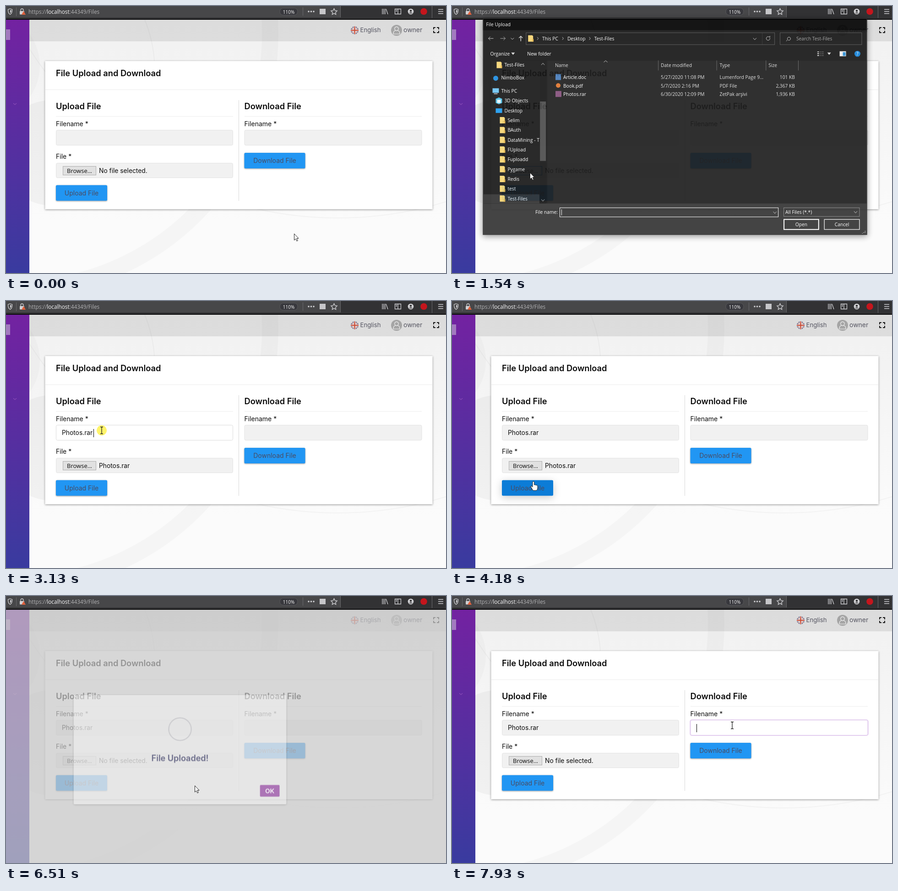
An HTML page for the animation above (8000 ms loop, 961x582 px).

```html
<!DOCTYPE html>
<html lang="en">
<head>
<meta charset="utf-8">
<title>File upload and download</title>
<style>
html, body { margin: 0; width: 100%; height: 100%; overflow: hidden; background: #fafafa; }
svg { display: block; width: 961px; height: 582px; }
text { font: 14px Inter, sans-serif; fill: #0b0b0b; white-space: pre; }
.head { font-size: 18.3px; font-weight: 600; }
.btn { fill: #4b4b60; text-anchor: middle; }
.top { font-size: 13.2px; fill: #545460; }
.url { font: 11.8px "Open Sans", sans-serif; fill: #b1b1b3; }
.field { fill: #f1f1f1; stroke: #e3e3e3; }
.line { fill: none; stroke-width: 1.3; stroke: #d0d0d3; }
.blue { fill: #2196f3; filter: drop-shadow(0 1px 1.5px rgba(0,0,0,.4)); }
#dialog { filter: drop-shadow(0 3px 7px rgba(0,0,0,.45)); transform-origin: 487px 263px; }
#dialog text { font: 10.3px "Open Sans", sans-serif; fill: #fff; }
#dialog text.soft { fill: #dedede; }
#dialog text.dim { fill: #a5a5a5; }
#dialog text.end { text-anchor: end; }
#dialog text.mid { text-anchor: middle; }
#dialog .thin { fill: none; stroke: #c8c8c8; }
#modal { transform-origin: 380px 335px; }
</style>
</head>
<body>
<svg viewBox="0 0 961 582">
  <defs>
    <linearGradient id="side" x2="0" y2="1"><stop stop-color="#7322a1"/><stop offset="1" stop-color="#393b9f"/></linearGradient>
    <linearGradient id="page" x2="0" y2="1"><stop stop-color="#f1f1f1"/><stop offset=".2" stop-color="#f3f3f3"/><stop offset=".8" stop-color="#fbfbfb"/></linearGradient>
    <clipPath id="round"><circle cx="761.5" cy="53" r="8.5"/></clipPath>
    <clipPath id="tree"><rect x="66" y="118" width="124" height="313"/></clipPath>
  </defs>

  <!-- page background -->
  <rect y="30" width="961" height="552" fill="url(#page)"/>
  <g fill="none" stroke="#000">
    <circle cx="20" cy="60" r="557" stroke-width="36" stroke-opacity=".025"/>
    <circle cx="-45" cy="130" r="119" fill="#000" fill-opacity=".018" stroke="none"/>
    <circle cx="100" cy="320" r="115" fill="#000" fill-opacity=".035" stroke="none"/>
    <circle cx="725" cy="-338" r="800" stroke-opacity=".03" stroke-width="2"/>
    <path d="M303 30Q321 74 324 120" stroke-opacity=".03" stroke-width="2"/>
  </g>
  <rect x="51" y="30" width="910" height="47" fill="#000" fill-opacity=".085"/>
  <rect y="30" width="51" height="552" fill="url(#side)"/>
  <rect y="51" width="9" height="23" fill="#a27abf"/>
  <path d="M16 212l3.500 3 3.500-3" fill="none" stroke="#a35fc4"/>

  <!-- header -->
  <g clip-path="url(#round)">
    <path d="M753 44h17v18h-17z" fill="#3c4a78"/>
    <path d="M753 44.500l17 17m0-17l-17 17" stroke="#eee" stroke-width="3"/>
    <path d="M753 44.500l17 17m0-17l-17 17" stroke="#c8503c"/>
    <path d="M761.500 44v18M753 53h17" stroke="#eee" stroke-width="5"/>
    <path d="M761.500 44v18M753 53h17" stroke="#c8503c" stroke-width="2.500"/>
  </g>
  <text class="top" x="773.500" y="57">English</text>
  <circle cx="853" cy="53" r="12" fill="#a5a5a5"/>
  <g fill="none" stroke="#f2f2f2" stroke-width="1.200"><circle cx="853" cy="49.500" r="4.200"/><path d="M846 61q0-7 4.500-7.500h5q4.500 .5 4.500 7.500z"/></g>
  <text class="top" x="868" y="57" style="font-size:14px">owner</text>
  <path d="M934 51v-4h4m3 0h4v4m0 3v4h-4m-3 0h-4v-4" fill="none" stroke="#1c1c1c" stroke-width="2"/>

  <!-- card -->
  <rect x="85.500" y="120" width="846" height="323" fill="#fff" style="filter:drop-shadow(0 1px 2px rgba(0,0,0,.42))"/>
  <path d="M86 182.500h845M109 240.500h387M521 240.500h387" stroke="#ececec"/>
  <path d="M508.500 206v218" stroke="#c6c6c6" stroke-dasharray="2 1"/>
  <text class="head" x="109" y="153">File Upload and Download</text>
  <text class="head" x="109" y="225">Upload File</text>
  <text class="head" x="520.500" y="225">Download File</text>
  <text x="109" y="262">Filename *</text>
  <text x="520.500" y="262">Filename *</text>
  <text x="109" y="333">File *</text>
  <rect id="glowA" x="107.500" y="269" width="390" height="36" rx="5" fill="#ead9f4"/>
  <rect id="glowB" x="519" y="269" width="391" height="36" rx="5" fill="#ead9f4"/>
  <rect id="fieldA" class="field" x="109.500" y="270.500" width="386" height="33" rx="3"/>
  <rect id="fieldB" class="field" x="521" y="270.500" width="387" height="33" rx="3"/>
  <rect class="field" x="109.500" y="342.500" width="386" height="32" rx="3"/>
  <rect id="sel" y="278" height="19" fill="#a5cdf3"/>
  <text id="name" x="122" y="292" style="font-size:13.800px"></text>
  <path id="caretA" d="M191.500 279v18" stroke="#000"/>
  <path id="caretB" d="M534.500 279v18" stroke="#000"/>
  <rect id="browse" x="124.500" y="349.500" width="72" height="19"/>
  <text x="133" y="364" style="font:13px 'Open Sans',sans-serif">Browse...</text>
  <text id="file" x="203" y="364" style="font-size:13.800px"></text>
  <rect id="upload" class="blue" x="109" y="390.500" width="112" height="34" rx="2.500"/>
  <text class="btn" x="165" y="412.500">Upload File</text>
  <rect class="blue" x="520.500" y="320" width="133" height="34" rx="2.500"/>
  <text class="btn" x="587" y="341.500">Download File</text>

  <!-- busy layer and message -->
  <g id="busy">
    <rect y="30" width="961" height="552" fill="#fff" fill-opacity=".674"/>
    <path id="spin" d="M362 335a18 18 0 0 1 30-13" fill="none" stroke="#fff" stroke-width="4"/>
  </g>
  <rect id="shade" y="30" width="961" height="552"/>
  <g id="modal">
    <rect id="panel" x="144" y="214" width="472" height="242" rx="2" fill="#fff" style="filter:drop-shadow(0 1px 2px rgba(0,0,0,.4))"/>
    <g id="content">
      <circle cx="380" cy="289.500" r="25" fill="none" stroke="#bdbdc2" stroke-width="1.800"/>
      <path id="tick" d="M368 290l8 8 16-17" fill="none" stroke="#8fcf6c" stroke-width="3.500" stroke-dasharray="35"/>
      <text x="380" y="360.500" text-anchor="middle" style="font-size:18.300px;font-weight:600;fill:#494a70">File Uploaded!</text>
      <rect x="557.500" y="413" width="43.500" height="26" rx="2" fill="#9c55a9"/>
      <text x="579.300" y="431" text-anchor="middle" style="font-weight:600;fill:#fff">OK</text>
    </g>
  </g>

  <!-- browser bar -->
  <rect width="961" height="30" fill="#0c0c0d"/>
  <rect width="961" height="28" fill="#323234"/>
  <rect width="730" height="25" fill="#474749"/>
  <path d="M22.500 3v19M648.500 3v18M730.500 0v25M930.500 0v26" stroke="#6a6a6d"/>
  <path class="line" d="M9 6l4.500 1.500q.5 8-4.500 11-5-3-4.500-11z"/>
  <path d="M9 8.500v7q3-2 2.800-6z" fill="#d0d0d3"/>
  <path class="line" d="M32 11V9a3 3 0 0 1 6 0v2"/>
  <rect x="30" y="11" width="10" height="7.500" rx="1" fill="#d0d0d3"/>
  <path d="M38.500 11l4.500 8h-9z" fill="#e0603c"/>
  <text class="url" x="49" y="17">https://<tspan fill="#f9f9fa">localhost</tspan>:44349/Files</text>
  <rect x="598" y="4.500" width="39" height="15.500" rx="7.500" fill="#38383d" stroke="#59595c"/>
  <text class="url" x="617.500" y="16.500" text-anchor="middle" style="font-size:10px;fill:#f9f9fa">110%</text>
  <g fill="#d0d0d3"><circle cx="661" cy="12" r="1.800"/><circle cx="666.500" cy="12" r="1.800"/><circle cx="672" cy="12" r="1.800"/></g>
  <rect x="685" y="6" width="13" height="12" fill="#c6c6c9"/>
  <path class="line" d="M716.500 5.500l2 4.300 4.700.6-3.400 3.300.8 4.700-4.100-2.300-4.100 2.300.8-4.700-3.400-3.300 4.700-.6z"/>
  <path class="line" d="M822 6v12M825 6v12M828 6v12M830 6.500l4 11.500" stroke-width="1.800"/>
  <path class="line" d="M849.500 6.500h13v11h-13zM856 6.500v11M851.500 9h2.500m-2.500 2.500h2.500"/>
  <circle cx="884" cy="12" r="6.300" fill="#d0d0d3"/>
  <circle cx="884" cy="10.500" r="2.300" fill="#323234"/><path d="M880 16q4-4 8 0" fill="#323234"/>
  <circle cx="912.500" cy="12" r="7.300" fill="#c5161d"/>
  <path class="line" d="M944 7.500h11M944 12h11M944 16.500h11" stroke-width="1.800"/>

  <g id="dialog"></g>

  <!-- pointer -->
  <g id="pointer">
    <circle id="click" r="11" fill="#ffee1e"/>
    <path id="arrow" d="M.5.5V14.500L3.700 11.500 6 16.500 8.200 15.400 6 10.500H10Z" fill="#fff" stroke="#222"/>
    <path id="hand" d="M-2 1.500Q0-1.500 1.700 1.500V8l2-.5 1.500 1 2-.3 1.800 1.800V15q-.5 3-2 5H-1L-5.500 12.500q-.5-2.500 1.500-2l2 2z" fill="#fff" stroke="#222"/>
    <path id="beam" d="M-3-7.500H-1L0-6.500 1-7.500H3M-3 7.500H-1L0 6.500 1 7.500H3M0-6.500v13" fill="none" stroke="#222" stroke-width="1.300"/>
  </g>
</svg>
<script>
const $ = id => document.getElementById(id);
const set = (id, attrs) => { for (const k in attrs) $(id).setAttribute(k, attrs[k]); };
const show = (id, on) => set(id, { opacity: +on });

// dialog parts
const text = (x, y, s, cls = '') => `<text x="${x}" y="${y}" class="${cls}">${s}</text>`;
const box = (x, y, w, h, fill, more = '') => `<rect x="${x}" y="${y}" width="${w}" height="${h}" fill="${fill}" ${more}/>`;
const dot = (x, y, r, fill) => `<circle cx="${x}" cy="${y}" r="${r}" fill="${fill}"/>`;
const thin = (d, more = '') => `<path class="thin" d="${d}" ${more}/>`;
const folder = (x, y) => `<path d="M${x} ${y - 7}h9l2 2v12H${x}z" fill="#f7d675"/><path d="M${x + 9} ${y + 1}h3v6h-3z" fill="#e3b349"/>`;
const down = (x, y) => thin(`M${x - 3.5} ${y - 2}l3.500 4 3.500-4`);
const right = (x, y) => thin(`M${x - 1} ${y - 3}l2.500 3-2.500 3`);
const screen = (x, y, c) => box(x, y - 5, 14, 10, c);

const folders = ['Selim', 'BAuth', 'DataMining - T', 'FUpload', 'Fuploadd', 'Pygame', 'Redis', 'test', 'Test-Files'];
const rowY = i => 249 + 21.4 * i;
const files = [
  ['Article.doc', '5/27/2020 11:08 PM', 'Lumenford Page 9...', '101 KB', box(225, 148, 12, 13, '#4a7ebb')],
  ['Book.pdf', '5/7/2020 2:16 PM', 'PDF File', '2,367 KB', dot(231, 173, 5, '#e0762f')],
  ['Photos.rar', '6/30/2020 12:09 PM', 'ZetPak arşivi', '1,936 KB', box(225, 185, 13, 13, '#85507c')]
];
const columns = [[224, 'Name'], [456, 'Date modified'], [585, 'Type'], [692, 'Size']];

$('dialog').innerHTML =
  box(66, 26, 842, 473.5, '#191919') + box(66, 26, 842, 26, '#050505') +
  box(207, 118, 701, 313, '#202020') + box(66, 431, 842, 68.5, '#353535') +
  box(66.5, 26.5, 841, 473, 'none', 'stroke="#3c3c3c"') +
  '<text id="title" y="43">File Upload</text>' +
  thin('M89 70H78m4-4l-4 4 4 4') + thin('M104 70h11m-4-4l4 4-4 4', 'opacity=".8"') +
  thin('M127 69l3.500 3 3.500-3') + thin('M149 76V65m-4 4l4-4 4 4', 'stroke-width="1.600"') +
  box(160.5, 57.5, 545, 26, 'none', 'stroke="#555"') + box(717.5, 57.5, 179, 26, 'none', 'stroke="#555"') +
  folder(165, 70) + [186, 241, 300].map(x => right(x, 70)).join('') +
  text(196, 74, 'This PC') + text(251, 74, 'Desktop') + text(310, 74, 'Test-Files') +
  down(662, 71) + thin('M678.5 58v25', 'opacity=".15"') + thin('M695 69a4 4 0 1 1-2-2.500l2 1v-3') +
  thin('M731 76l3-3.500a3.500 3.500 0 1 1 1 1') + text(753, 74, 'Search Test-Files', 'dim') +
  text(82, 107, 'Organize') + text(163, 107, 'New folder') +
  '<path d="M128 101h8l-4 5zM821 101h8l-4 5z" fill="#ddd"/>' +
  thin('M799 99.500h4m-4 4h4m-4 4h4', 'stroke-width="2"') + thin('M805 99.500h3m1 0h4m-8 4h3m1 0h4m-8 4h3m1 0h4', 'opacity=".6"') +
  box(848, 98, 14, 11, '#eee') + box(855, 100, 6, 8, '#2d8fd5') +
  dot(887, 103.5, 6.5, '#1683d8') + text(887, 107, '?', 'mid') +
  '<g clip-path="url(#tree)">' + box(66, 411, 124, 20, '#333') +
  folder(96, 128) + text(113, 132, 'Test-Files') + dot(94, 157, 5.5, '#1f8de0') + text(106, 160, 'NimboBox') +
  screen(87, 184, '#6fc4f4') + box(90, 190, 8, 2, '#aaa') + text(106, 189, 'This PC') +
  '<path d="M94 202l7-3 7 3v9l-7 3-7-3z" fill="#4fc0e8"/><path d="M97 204h8v7h-8z" fill="#eaf8fd"/>' + text(113, 210, '3D Objects') +
  screen(94, 228, '#1f9cf0') + text(113, 232, 'Desktop') +
  folders.map((s, i) => folder(103, rowY(i)) + text(120, rowY(i) + 4, s)).join('') + '</g>' +
  box(191, 118, 13, 313, '#171717') + box(191, 208, 13, 130, '#4d4d4d') +
  down(197.5, 424) + thin('M194 128l3.500-4 3.500 4') + thin('M331 122l4-3.500 4 3.500') +
  '<path d="M450.500 118v22M578.500 118v22M686.500 118v22M757.500 118v22" stroke="#636363"/>' +
  columns.map(([x, s]) => text(x, 133, s, 'soft')).join('') +
  '<rect id="row" x="221" y="183" width="533" height="19"/>' +
  files.map(([name, date, type, size, icon], i) => {
    const y = 158.5 + 18.8 * i;
    return icon + text(242, y, name) + text(456, y, date, 'soft') + text(585, y, type, 'soft') + text(750, y, size, 'soft end');
  }).join('') +
  text(230, 454, 'File name:', 'end') + box(234.5, 440.5, 479, 20, '#353535', 'stroke="#fff"') +
  '<text id="chosen" x="238" y="454.500"></text><path id="caretC" d="M238.500 444v13" stroke="#fff"/>' + down(706, 451) +
  box(725.5, 440.5, 166, 19, '#353535', 'stroke="#8a8a8a"') + text(729, 454, 'All Files (*.*)') + down(883, 450) +
  box(726, 466, 76, 22, '#353535', 'stroke="#fff" stroke-width="2"') + text(764, 480.5, 'Open', 'mid') +
  box(814.5, 466, 77, 22, '#353535', 'stroke="#ddd" stroke-width="1.500"') + text(853, 480.5, 'Cancel', 'mid') +
  thin('M904 491v6M901 494v3M898 496v1', 'stroke-dasharray="1.500 1.500" stroke-width="1.500"') +
  `<g id="early">${dot(79, 39, 6.5, '#e8792c')}${thin('M889 34l9 9m0-9l-9 9')}${box(66, 346, 124, 21, '#fff', 'fill-opacity=".18"')}
   ${down(75, 185)}${down(83, 228)}${folders.map((s, i) => right(90, rowY(i))).join('')}</g>`;

// keyframes: [time, value, value...]
function at(keys, t, ease = p => p) {
  const i = keys.findIndex(k => k[0] > t);
  if (i < 0) return keys.at(-1).slice(1);
  if (!i) return keys[0].slice(1);
  const a = keys[i - 1], b = keys[i], p = ease((t - a[0]) / (b[0] - a[0]));
  return a.slice(1).map((v, n) => v + (b[n + 1] - v) * p);
}
const smooth = p => p * p * (3 - 2 * p);
const between = (t, a, b) => t >= a && t < b;

const path = [
  [250, 629, 496], [1020, 170, 363], [1550, 170, 363], [1870, 258, 203], [1920, 258, 203], [2120, 269, 192],
  [2380, 269, 192], [2630, 250, 372], [2750, 250, 372], [3070, 209, 282], [3150, 209, 282], [3330, 66, 263],
  [3530, 190, 288], [3600, 190, 288], [3730, 230, 316], [4180, 178, 393], [4360, 178, 393], [4410, 179, 393],
  [4560, 178, 393], [5670, 178, 393], [5680, 197, 393], [5800, 197, 393], [6480, 412, 413], [6540, 412, 413],
  [7020, 576, 425], [7300, 576, 425], [7720, 612, 282]
];
const clicks = [1080, 2090, 2230, 3080, 3690, 5710, 7080, 7740];
const dialogFade = [[1340, 0, .94], [1410, .4, .97], [1560, 1, 1], [2320, 1, 1], [2480, 0, .93]];
const modalFade = [[6440, 0], [6510, .39], [6620, 1], [7300, 1], [7480, 0]];
const modalScale = [[6440, .9], [6510, .983], [6560, 1.04], [6640, .97], [6720, 1]];
const busyFade = [[5780, 0], [5960, 1], [6510, 1], [6660, 0]];
const glowA = [[3130, 0], [3280, 1], [3700, 1], [3850, 0]];
const glowB = [[7750, 0], [7900, 1]];
const hoverUp = [[4080, 0], [4180, 1], [5760, 1], [5900, 0]];

function focusField(id, on, glow) {
  show('glow' + id, glow);
  $('field' + id).style.cssText = on ? `fill:#fff;stroke:${glow > .5 ? '#dcc3ea' : '#dcdcdc'}` : '';
}

function draw(t) {
  const [x, y] = at(path, t, smooth);
  const inside = (l, top, r, b) => x >= l && x <= r && y >= top && y <= b;

  // form
  const picked = t >= 2330;
  $('name').textContent = picked ? 'Photos.rar' : '';
  $('file').textContent = between(t, 2330, 6350) ? 'Photos.rar' : 'No file selected.';
  const hot = between(t, 950, 2500) && inside(124, 349, 197, 370);
  set('browse', { fill: hot ? '#e5f1fb' : '#e1e1e1', stroke: hot ? '#0078d7' : '#adadad' });
  focusField('A', between(t, 3080, 3700), at(glowA, t)[0]);
  focusField('B', t >= 7740, at(glowB, t)[0]);
  const selFrom = t < 3330 ? Math.min(191, Math.max(122, x)) : 122;
  const selected = between(t, 3150, 3700);
  set('sel', { x: selFrom, width: selected ? 191 - selFrom : 0 });
  show('caretA', between(t, 3080, 3160));
  show('caretB', t >= 7740);
  const h = at(hoverUp, t)[0];
  $('upload').style.cssText = h
    ? `fill:rgb(${33 - 21 * h},${150 - 26 * h},${243 - 28 * h});filter:drop-shadow(0 ${1 + 3 * h}px ${1.5 + 7 * h}px rgba(0,0,0,${.4 - .2 * h}))` : '';

  // busy layer and message
  show('busy', at(busyFade, t)[0]);
  set('spin', { transform: `rotate(${(t - 6510) * .36} 380 335)` });
  const m = at(modalFade, t)[0];
  set('shade', { opacity: .4 * m });
  show('panel', m);
  show('content', Math.min(1, m * 2));
  $('modal').style.transform = `scale(${at(modalScale, t)[0]})`;
  set('tick', { 'stroke-dashoffset': at([[6600, 35], [6800, 0]], t)[0], opacity: t > 6600 ? 1 : 0 });

  // dialog
  const [alpha, scale] = at(dialogFade, t);
  const early = t < 1540;
  $('dialog').style.opacity = alpha;
  $('dialog').style.transform = `scale(${scale})`;
  show('early', early);
  set('title', { x: early ? 91 : 73 });
  const chosen = t >= 2090;
  const over = inside(221, 183, 754, 202);
  set('row', { fill: chosen ? '#777' : over ? '#4d4d4d' : 'none' });
  $('chosen').textContent = chosen ? 'Photos.rar' : '';
  show('caretC', !chosen);

  // pointer
  const free = between(t, 2480, 5800) || t > 7480;
  const beam = between(t, 3150, 3420) || free && (inside(109, 270, 496, 304) || inside(521, 270, 908, 304));
  const hand = free && inside(109, 390, 221, 424) || between(t, 6700, 7300) && inside(555, 412, 598, 438);
  set('pointer', { transform: `translate(${x} ${y})` });
  show('beam', beam);
  show('hand', hand);
  show('arrow', !beam && !hand);
  const since = t - (clicks.findLast(c => c <= t) ?? -999);
  show('click', since < 110 ? .66 : 0);
}

function frame() {
  draw(performance.now() % 8000);
  requestAnimationFrame(frame);
}
frame();
</script>
</body>
</html>
```
